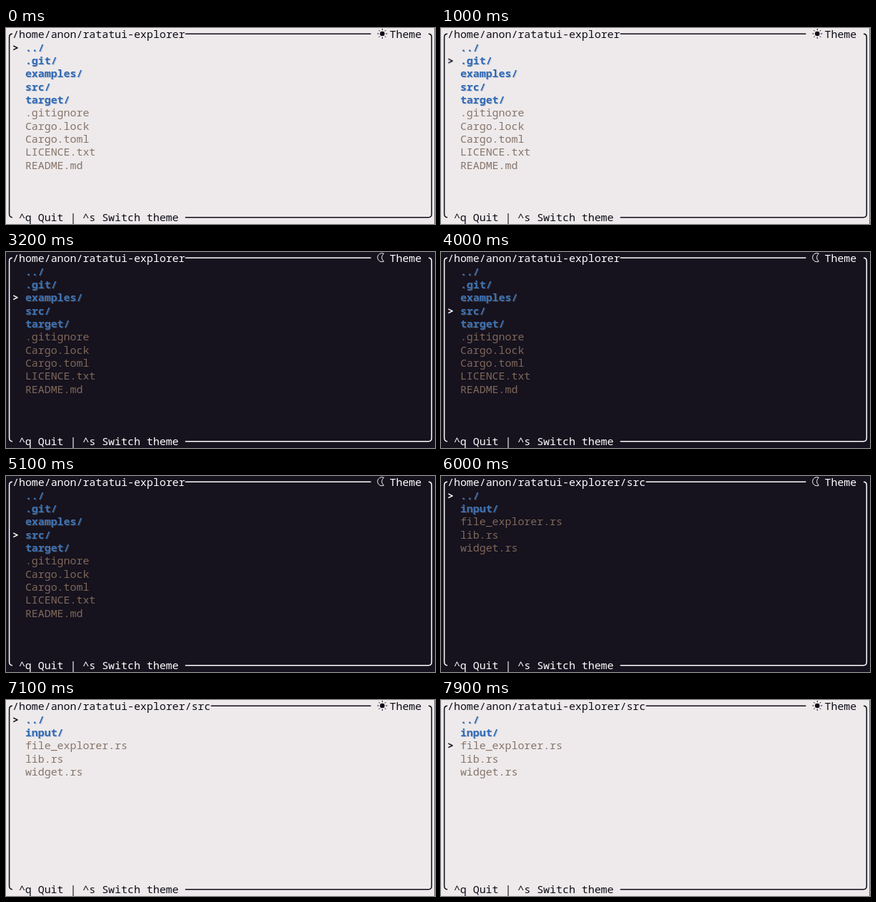
An HTML page for the animation above (8 s loop, 600 px wide and 275 px high).

```html
<!DOCTYPE html>
<html lang="en">
<head>
<meta charset="utf-8">
<title>File explorer</title>
<style>
  html, body { margin: 0; height: 100%; overflow: hidden; }

  /* 67 x 15 character cells of 8.955 x 18.333 px */
  svg {
    display: block;
    width: 600px;
    height: 275px;
    background: var(--bg);
    animation: theme 8s step-end infinite;
  }
  text {
    font: 14.925px "Noto Sans Mono", "DejaVu Sans Mono", monospace;
    fill: var(--fg);
    white-space: pre;
  }
  .frame { fill: none; stroke: var(--fg); stroke-width: 1.5; }
  .edge { fill: #16121e; opacity: .6; }
  .dirs text { font-weight: 600; fill: var(--dir); }
  .dirs { filter: drop-shadow(1px 1px 0 var(--shade)); }
  .files text { fill: var(--file); }

  .sun { opacity: var(--day); fill: var(--fg); stroke: var(--fg); }
  .moon { opacity: calc(1 - var(--day)); fill: none; stroke: var(--fg); }

  .root, .src, .cursor { animation: 8s step-end infinite; }
  .root { animation-name: leave; }
  .src { animation-name: enter; }
  .cursor { animation-name: select; font-weight: 600; }

  @keyframes theme {
    0%, 88.75%, 100% {
      --bg: #eeeaeb; --fg: #0d0d18; --dir: #3069b4;
      --file: #86756b; --shade: #a3b2c9aa; --day: 1;
    }
    40% {
      --bg: #16121e; --fg: #fff; --dir: #3e73b4;
      --file: #7f6858; --shade: #4b494a99; --day: 0;
    }
  }
  @keyframes leave {
    0%, 100% { visibility: visible; }
    75% { visibility: hidden; }
  }
  @keyframes enter {
    0%, 100% { visibility: hidden; }
    75% { visibility: visible; }
  }
  @keyframes select {
    0%, 75%, 100% { transform: translateY(0); }
    11.25%, 96.25% { transform: translateY(18.333px); }
    16.25%, 98.75% { transform: translateY(36.667px); }
    48.75%, 63.75% { transform: translateY(55px); }
    61.25% { transform: translateY(73.333px); }
  }
</style>
</head>
<body>
<svg viewBox="0 0 600 275">
  <rect class="edge" x="599" width="1" height="275"/>
  <g class="frame">
    <path d="M9 8.3Q4.6 8.3 4.6 13V261Q4.6 265.7 9 265.7"/>
    <path d="M591 8.3Q595.3 8.3 595.3 13V261Q595.3 265.7 591 265.7H250.7"/>
  </g>

  <g class="sun" transform="translate(526.3 8)">
    <circle r="3.3" stroke="none"/>
    <path d="M0-4.8V-7M0 4.8V7M-4.8 0H-7M4.8 0H7M-3.5-3.5-5-5M3.5-3.5 5-5M-3.5 3.5-5 5M3.5 3.5 5 5"/>
  </g>
  <path class="moon" d="M528.5 2.4A6 6 0 1 0 528.5 13A6.4 6.4 0 0 1 528.5 2.4Z"/>
  <text x="536.5" y="13.7">Theme</text>
  <text x="17.9" y="270.7">^q Quit | ^s Switch theme</text>
  <text class="cursor" x="9" y="32.5">&gt;</text>

  <g class="root">
    <text x="9" y="13.7">/home/anon/ratatui-explorer</text>
    <path class="frame" d="M250.7 8.3H510.4"/>
    <g class="dirs">
      <text x="26.9" y="32.5">../</text>
      <text x="26.9" y="50.9">.git/</text>
      <text x="26.9" y="69.2">examples/</text>
      <text x="26.9" y="87.5">src/</text>
      <text x="26.9" y="105.9">target/</text>
    </g>
    <g class="files">
      <text x="26.9" y="124.2">.gitignore</text>
      <text x="26.9" y="142.5">Cargo.lock</text>
      <text x="26.9" y="160.9">Cargo.toml</text>
      <text x="26.9" y="179.2">LICENCE.txt</text>
      <text x="26.9" y="197.5">README.md</text>
    </g>
  </g>

  <g class="src">
    <text x="9" y="13.7">/home/anon/ratatui-explorer/src</text>
    <path class="frame" d="M286.6 8.3H510.4"/>
    <g class="dirs">
      <text x="26.9" y="32.5">../</text>
      <text x="26.9" y="50.9">input/</text>
    </g>
    <g class="files">
      <text x="26.9" y="69.2">file_explorer.rs</text>
      <text x="26.9" y="87.5">lib.rs</text>
      <text x="26.9" y="105.9">widget.rs</text>
    </g>
  </g>
</svg>
</body>
</html>
```
